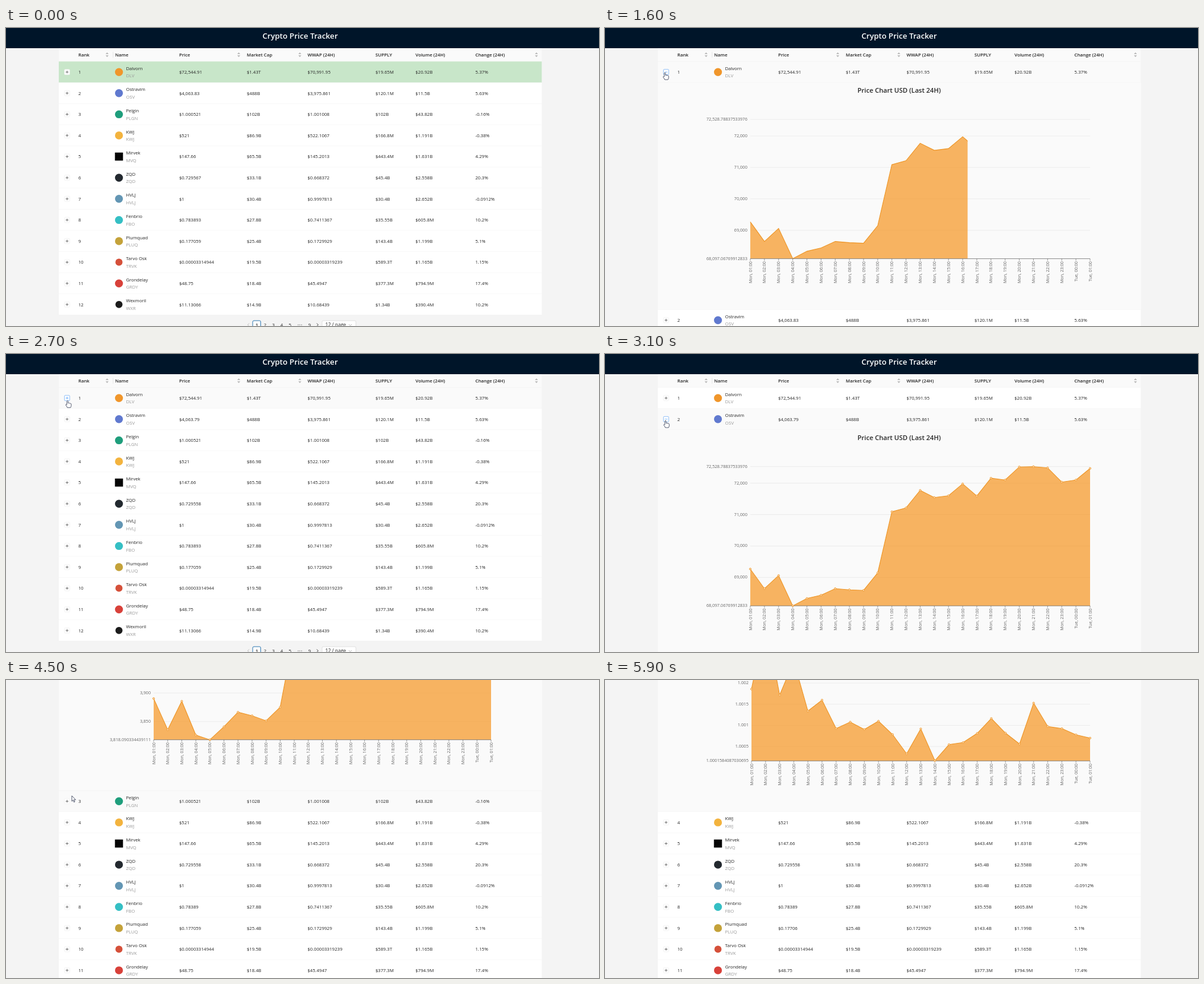
An HTML page that plays this animation: 1000 by 502 pixels, repeating every 6300 ms.

```html
<!DOCTYPE html>
<html lang="en">
<head>
<meta charset="utf-8">
<title>Crypto Price Tracker</title>
<style>
  html, body { margin: 0; width: 100%; height: 100%; overflow: hidden; background: #f4f4f4; }
  svg { display: block; width: 100vw; height: 100vh; }
  text { font-family: "Open Sans", "Noto Sans", sans-serif; font-size: 7.65px; fill: #262626; white-space: pre; }
  .bold { font-weight: 600; font-size: 7.75px; }
  .muted { fill: #999; }
  .axis { font-size: 7.15px; fill: #666; }
</style>
</head>
<body>
<svg id="stage" viewBox="0 0 1000 502" preserveAspectRatio="none"></svg>
<script>
const LOOP = 6300, STEP = 100;
const LEFT = 89, WIDTH = 814.5, TOP = 56.4, ROW = 35.6, PANEL = 382.4;
const PLOT_RIGHT = 818, PLOT_HEIGHT = 234.6;

const columns = [[122, 'Rank', 170.5], [184, 'Name'], [292, 'Price', 392.5], [406, 'Market Cap', 495.5],
  [508.5, 'WWAP (24H)'], [623, 'SUPPLY'], [690.5, 'Volume (24H)'], [791.5, 'Change (24H)', 894.5]];

// name | ticker | icon colour | price | cap | average | supply | volume | change
const rows = `Dalvorn|DLV|#f0962b|$72,544.91|$1.43T|$70,991.95|$19.65M|$20.92B|5.37%
Ostravim|OSV|#6079cf|$4,063.83|$488B|$3,975.861|$120.1M|$11.5B|5.63%
Pelgin|PLGN|#1f9e7c|$1.000521|$102B|$1.001008|$102B|$43.82B|-0.16%
KWJ|KWJ|#f3b33e|$521|$86.9B|$522.1067|$166.8M|$1.191B|-0.38%
Mirvek|MVQ|#050505|$147.66|$65.5B|$145.2013|$443.4M|$1.631B|4.29%
ZQD|ZQD|#23292f|$0.729567|$33.1B|$0.668372|$45.4B|$2.558B|20.3%
HVLJ|HVLJ|#6396b4|$1|$30.4B|$0.9997813|$30.4B|$2.652B|-0.0912%
Fenbrio|FBO|#35bfc4|$0.783893|$27.8B|$0.7411367|$35.55B|$605.8M|10.2%
Plumquad|PLUQ|#c4a23a|$0.177059|$25.4B|$0.1729929|$143.4B|$1.199B|5.1%
Tarvo Osk|TRVK|#d5503a|$0.00003314944|$19.5B|$0.00003319239|$589.3T|$1.165B|1.15%
Grondelay|GRDY|#d8413a|$48.75|$18.4B|$45.4947|$377.3M|$794.9M|17.4%
Wexmoril|WXR|#1c1c1c|$11.13066|$14.9B|$10.68439|$1.34B|$390.4M|10.2%`
  .split('\n').map(line => line.split('|'));

const UP = '#c8e6c9', DOWN = '#ffcdd2';
const updates = [
  { row: 0, from: 0, to: 300, color: UP },
  { row: 5, from: 300, to: 600, color: DOWN, price: '$0.729558' },
  { row: 1, from: 2400, to: 2700, color: DOWN, price: '$4,063.79' },
  { row: 7, from: 3200, to: 3200, price: '$0.78389' },
  { row: 8, from: 5400, to: 5700, color: UP, price: '$0.17706' },
];

// heights are pixels above the time axis, one per hour
const charts = [
  { start: 1300, length: 750, left: 245, low: '68,097.06769912833', high: '72,528.78837533976',
    ticks: [69000, 70000, 71000, 72000],
    heights: [62, 29, 51, 0, 12.5, 18, 29, 27, 26, 55.5, 158.5, 165, 194.5, 182.5, 185.5, 205.5, 185,
      215, 212, 234, 234.5, 232.5, 208.5, 212, 231.5] },
  { start: 3300, length: 600, left: 249, low: '3,818.090334439111', high: '4,062.1303647879586',
    ticks: [3850, 3900, 3950, 4000, 4050],
    heights: [69.5, 17, 65, 8, 0, 22, 46.5, 40.5, 32, 55, 179.5, 187, 204.5, 203, 207.5, 231, 202,
      213, 200, 215, 217, 234.5, 209, 207.5, 228.5] },
  { start: 5300, length: 600, left: 247, low: '1.0001584087030695', high: '1.0034533810446512',
    ticks: [1.0005, 1.001, 1.0015, 1.002, 1.0025, 1.003],
    heights: [121, 234.6, 111, 168, 84, 102.5, 54.5, 65.5, 53, 67, 44.5, 12, 54, 0.5, 27.5, 31, 46.5,
      71.5, 47, 28.5, 97.5, 58, 54.5, 44, 38.5] },
];

// time, x, y of the pointer tip
const pointerPath = [[400, 115, 108], [900, 101, 75], [2100, 101, 75], [2200, 104, 72], [2600, 104, 72],
  [3000, 102, 112], [3400, 102, 112], [3900, 116, 133], [4500, 111, 195], [5000, 102, 200], [5200, 102, 200]];

const clamp = v => Math.max(0, Math.min(1, v));
const mix = (a, b, u) => a + (b - a) * u;
const smooth = u => u * u * (3 - 2 * u);
const ease = u => smooth(Math.pow(clamp(u), 0.57));
const n = v => +v.toFixed(2);

const text = (x, y, str, cls = '', extra = '') => `<text x="${n(x)}" y="${n(y)}" class="${cls}" ${extra}>${str}</text>`;
const rect = (x, y, w, h, fill, extra = '') =>
  `<rect x="${n(x)}" y="${n(y)}" width="${n(w)}" height="${n(h)}" fill="${fill}" ${extra}/>`;
const path = (d, stroke, extra = 'fill="none"') => `<path d="${d}" stroke="${stroke}" ${extra}/>`;
const hLine = (x1, x2, y, color) => path(`M${x1} ${n(y)}H${x2}`, color, 'fill="none" stroke-width=".7"');

const openRow = t => t >= 5200 ? 2 : t >= 3100 ? 1 : t >= 1100 && t < 2600 ? 0 : -1;
const scrollAt = t => 323.5 * smooth(clamp((t - 3960) / 540));

function pointerAt(t) {
  const i = pointerPath.findIndex(p => p[0] > t);
  if (i < 1) return null;
  const [a, b] = [pointerPath[i - 1], pointerPath[i]];
  const u = smooth((t - a[0]) / (b[0] - a[0]));
  return { x: mix(a[1], b[1], u), y: mix(a[2], b[2], u) };
}

function drawHeader() {
  let s = rect(0, 0, 1000, 34, '#001529') +
    text(496, 17.6, 'Crypto Price Tracker', 'bold', 'text-anchor="middle" style="font-size:13.1px;fill:#fff"') +
    rect(LEFT, 34, WIDTH, TOP - 34, '#fafafa') + hLine(LEFT, LEFT + WIDTH, TOP, '#f0f0f0') +
    path('M180.5 40V50', '#e8e8e8');
  for (const [x, label, sorter] of columns) {
    s += text(x, 47.7, label, 'bold');
    if (sorter) s += `<path d="M${sorter - 2.5} 44l2.5-3 2.5 3zm0 2h5l-2.5 3z" fill="#b8b8b8"/>`;
  }
  return s;
}

function drawToggle(y, minus, active) {
  const color = active ? '#69a9f5' : '#f0f0f0';
  return rect(98.5, y - 4.5, 9, 9, '#fff', `rx="1.5" stroke="${color}" stroke-width=".7"`) +
    path(`M100.6 ${n(y)}h4.8` + (minus ? '' : `M103 ${n(y - 2.4)}v4.8`), active ? '#4096ff' : '#333', 'fill="none" stroke-width=".65"');
}

function drawRow(i, y, t, hovered, active) {
  const [name, ticker, color, price, ...rest] = rows[i];
  const mid = y + ROW / 2, base = mid + 2.7;
  let shownPrice = price;
  let s = rect(LEFT, y, WIDTH, ROW, hovered ? '#fafafa' : '#fff');
  for (const u of updates) {
    if (u.row !== i || t < u.from) continue;
    shownPrice = u.price || shownPrice;
    if (t < u.to) s += rect(LEFT, y, WIDTH, ROW, u.color, `opacity="${clamp((u.to - t) / 150)}"`);
  }
  s += hLine(LEFT, LEFT + WIDTH, y + ROW, '#f0f0f0');
  s += drawToggle(mid, openRow(t + STEP) === i, active);
  s += i === 4 ? rect(183.7, mid - 6.8, 13.6, 13.6, color)
    : `<circle cx="190.5" cy="${n(mid)}" r="${i === 9 || i === 11 ? 6 : 6.7}" fill="${color}"/>`;
  s += text(122, base, i + 1) + text(202.5, base - 6.2, name) + text(202.5, base + 6.5, ticker, 'muted');
  [shownPrice, ...rest].forEach((value, k) => s += text(columns[k + 2][0], base, value));
  return s;
}

function drawPanel(y, t) {
  let s = rect(LEFT, y, WIDTH + 0.5, PANEL, '#fafafa') +
    hLine(LEFT, LEFT + WIDTH, y + PANEL, '#f0f0f0') +
    text(496, y + 17.4, 'Price Chart USD (Last 24H)', 'bold', 'text-anchor="middle" style="font-size:11.1px"');
  const index = charts.filter(c => t >= c.start).length - 1;
  if (index < 0) return s;

  const chart = charts[index], before = charts[index - 1];
  const u = clamp((t - chart.start) / chart.length), moved = ease(u);
  const bottom = y + 296.6, top = bottom - PLOT_HEIGHT, left = chart.left;
  const value = label => +String(label).replace(/,/g, '');
  const low = value(chart.low), span = value(chart.high) - low;

  for (const label of [chart.low, ...chart.ticks, chart.high]) {
    const gy = bottom - PLOT_HEIGHT * (value(label) - low) / span;
    const shown = typeof label === 'string' ? label : label.toLocaleString('en-US', { maximumFractionDigits: 4 });
    s += hLine(left, PLOT_RIGHT, gy, '#e6e6e6') + text(left - 5, gy + 2, shown, 'axis', 'text-anchor="end"');
  }

  const points = chart.heights.map((h, i) => {
    const x = mix(left, PLOT_RIGHT, i / 24);
    if (!before) return [x, bottom - h];
    return [mix(mix(before.left, PLOT_RIGHT, i / 24), x, moved), bottom - mix(before.heights[i], h, moved)];
  });
  const line = 'M' + points.map(p => p.map(n).join(' ')).join('L');
  const reveal = before ? 1 : moved;
  s += `<clipPath id="reveal">${rect(left - 3, top - 4, (PLOT_RIGHT - left + 6) * reveal, PLOT_HEIGHT + 6, '#000')}</clipPath>` +
    `<g clip-path="url(#reveal)"><path d="${line}V${n(bottom)}H${n(points[0][0])}z" fill="#f7931a" fill-opacity=".68"/>` +
    path(line, '#ee9526', 'fill="none" stroke-width="1.1"') + '</g>';

  s += hLine(left, PLOT_RIGHT, bottom, '#666');
  points.forEach((p, i) => {
    const x = mix(left, PLOT_RIGHT, i / 24), hour = String((i + 1) % 24).padStart(2, '0');
    s += path(`M${n(x)} ${n(bottom)}v3.5`, '#777', 'stroke-width=".7"') +
      text(0, 0, `${i < 23 ? 'Mon' : 'Tue'}, ${hour}:00`, 'axis',
        `text-anchor="end" transform="translate(${n(x + 2.6)} ${n(bottom + 4.5)}) rotate(-90)"`);
    if (u === 1) s += `<circle cx="${n(p[0])}" cy="${n(p[1])}" r="1.6" fill="#fcd9ae" stroke="#ee9526" stroke-width=".8"/>`;
  });
  return s;
}

function drawPager(y) {
  let s = rect(416, y - 6, 13.5, 13.5, '#fff', 'rx="2" stroke="#1668a8" stroke-width=".9"') +
    rect(533, y - 6, 57, 13.5, '#fff', 'rx="2" stroke="#d9d9d9" stroke-width=".8"') +
    path(`M410 ${y - 1.5}l-2.5 2.5 2.5 2.5`, '#bbb') + path(`M524 ${y - 1.5}l2.5 2.5-2.5 2.5`, '#444') +
    path(`M578 ${y}l2.5 2.5 2.5-2.5`, '#bbb');
  [[423, 1], [437, 2], [451, 3], [465, 4], [479, 5], [495.5, '•••'], [512, 9]].forEach(([x, label]) =>
    s += text(x, y + 3.6, label, label === 1 ? 'bold' : label === '•••' ? 'muted' : '', 'text-anchor="middle"'));
  return s + text(538.5, y + 3.6, '12 / page', '', 'style="font-size:8.1px"');
}

function drawPointer({ x, y }) {
  const hand = x < 108;
  const d = hand
    ? 'M-1 1Q0-1 1 1V4.5Q2 3.7 3 4.8 4 4 5 5.2 6.3 5 6.3 6.5V9Q6 10.5 5.2 12H-.3Q-1 10-3 7.6-2.8 5.8-1 7z'
    : 'M0 0V9.3l2.1-2 1.5 3.5 1.5-.7-1.5-3.3h2.9z';
  return `<g transform="translate(${n(x)} ${n(y)})">${path(d, '#2c3550', 'fill="#fff" stroke-width=".8"')}</g>`;
}

function render(t) {
  const open = openRow(t), scroll = scrollAt(t), pointer = pointerAt(t);
  let y = TOP, s = drawHeader();
  rows.forEach((_, i) => {
    const height = ROW + (i === open ? PANEL : 0), screenY = y - scroll;
    const hovered = pointer && pointer.y >= screenY && pointer.y < screenY + height;
    const active = hovered && (i === open || pointer.x < 108);
    s += drawRow(i, y, t, hovered, active);
    if (i === open) s += drawPanel(y + ROW, t);
    y += height;
  });
  s += drawPager(y + 15.4);
  stage.innerHTML = rect(0, 0, 1000, 502, '#f4f4f4') +
    `<g transform="translate(0 ${n(-scroll)})">${s}</g>` + (pointer ? drawPointer(pointer) : '');
}

const stage = document.getElementById('stage');
const startTime = performance.now();
let shown = -1;
function tick() {
  const elapsed = (performance.now() - startTime) % LOOP;
  const t = Math.min(5900, Math.floor(elapsed / STEP) * STEP);
  if (t !== shown) render(shown = t);
  requestAnimationFrame(tick);
}
tick();
</script>
</body>
</html>
```
